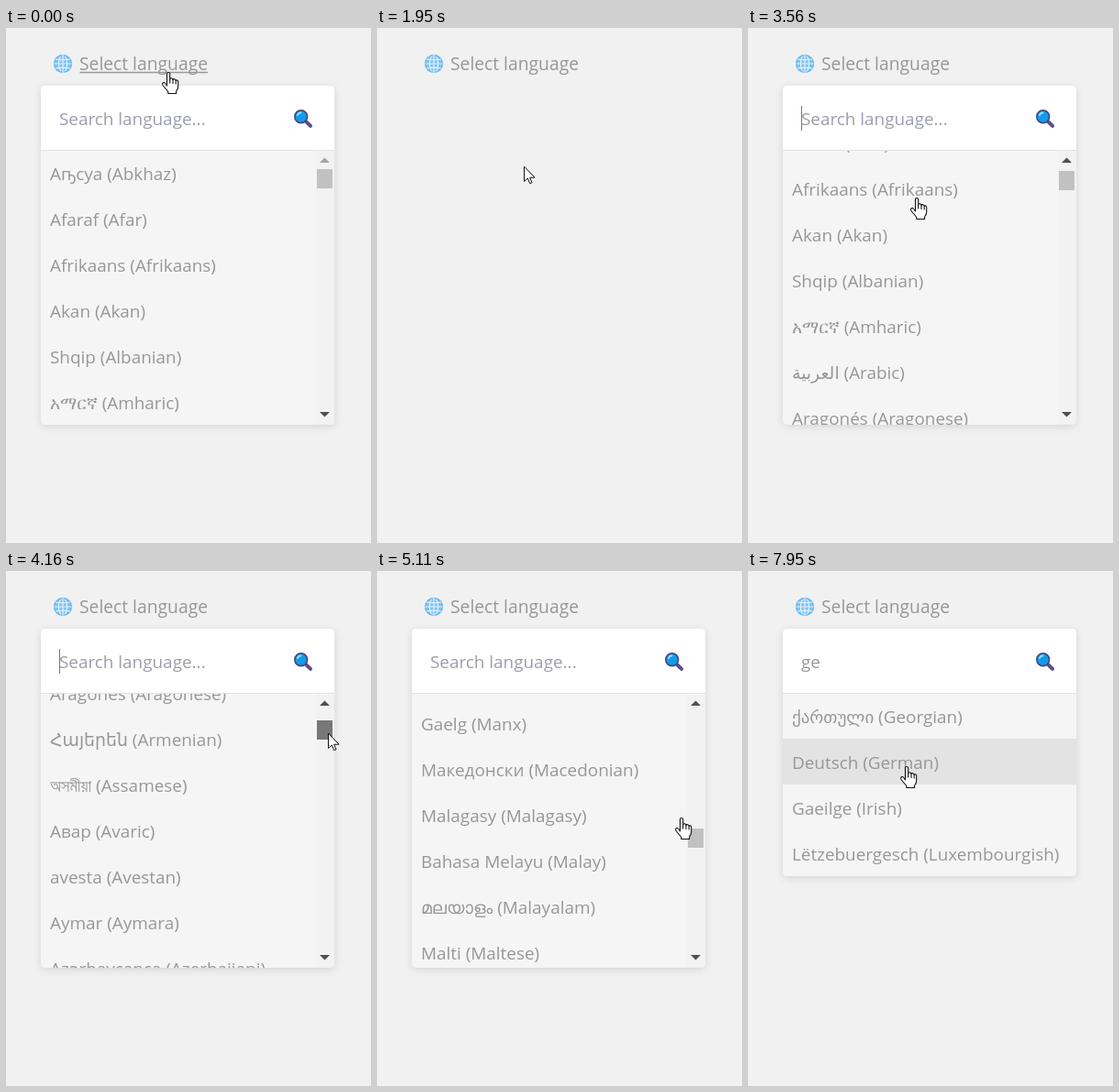
Write an HTML page that moves like this. It is 398 px wide and 562 px high and loops after 8000 ms.

```html
<!DOCTYPE html>
<html lang="en">
<head>
<meta charset="utf-8">
<title>Language picker</title>
<style>
html, body { margin: 0; width: 100%; height: 100%; overflow: hidden; background: #f1f1f1; }
svg { display: block; width: 398px; height: 562px; }
text { font-family: "Open Sans", "Noto Sans", "Noto Sans CJK KR", "DejaVu Sans", sans-serif; font-size: 18.9px; fill: #979797; white-space: pre; }
#title { font-size: 19.3px; }
#popup text { font-size: 15px; font-weight: 600; fill: #20232b; }
</style>
</head>
<body>
<svg viewBox="0 0 398 562">
  <defs>
    <clipPath id="listClip"><path id="listShape"/></clipPath>
    <filter id="soft" x="-20%" y="-20%" width="140%" height="140%"><feDropShadow dx="0" dy="2" stdDeviation="4" flood-opacity=".12"/></filter>
    <filter id="tight" x="-20%" y="-20%" width="140%" height="140%"><feDropShadow dx="0" dy="1" stdDeviation="1.6" flood-opacity=".32"/></filter>
  </defs>
  <rect width="398" height="562" fill="#f1f1f1"/>
  <g transform="translate(62 39)" fill="none" stroke="#e2f1fb" stroke-width="1.2">
    <circle r="10.2" fill="#80c3f2" stroke="none"/>
    <ellipse rx="4.6" ry="9.4"/><circle r="9.2" stroke="#72b9ed"/>
    <path d="M0-9.5V9.5M-9.5 0H9.5M-8-5Q0-3.4 8-5M-8 5Q0 3.4 8 5"/>
  </g>
  <text id="title" x="80" y="46">Select language</text>
  <path id="underline" d="M80.5 48.5H220" stroke="#999" stroke-width="1.3"/>

  <g id="panel">
    <rect id="back" x="38" y="63" width="320" rx="5" fill="#f5f5f5" filter="url(#soft)"/>
    <g id="list" clip-path="url(#listClip)">
      <rect id="hover" x="38" width="320" height="50" fill="#e3e3e3"/>
      <g id="rows"></g>
      <g id="bar">
        <rect x="338" y="133" width="20" height="300" fill="#f2f2f2"/>
        <rect id="thumb" x="339" width="17"/>
        <path id="up" d="M342 147L347.5 141.500L353 147Z"/>
        <path d="M342 419L347.5 424.500L353 419Z" fill="#505050"/>
      </g>
    </g>
    <path d="M38 134V68Q38 63 43 63H353Q358 63 358 68V134Z" fill="#e2e2e2"/>
    <path d="M38 133V68Q38 63 43 63H353Q358 63 358 68V133Z" fill="#fff"/>
    <text id="query" x="58" y="106"></text>
    <rect id="caret" x="58" y="85" width="1" height="27" fill="#777"/>
    <path d="M327.500 102.500L332 106.800" stroke="#5d4c94" stroke-width="4" stroke-linecap="round"/>
    <circle cx="321.700" cy="96.700" r="6.900" fill="#139bea" stroke="#46477b" stroke-width="1.6"/>
    <path d="M318 95Q319 92.300 321.500 92.500" fill="none" stroke="#8fdcff" stroke-width="2" stroke-linecap="round"/>
  </g>

  <g id="popup">
    <path d="M170 143H180L190 133L200 143H350Q358 143 358 151V236Q358 244 350 244H170Q162 244 162 236V151Q162 143 170 143Z" fill="#fff" filter="url(#tight)"/>
    <text x="177" y="177">sp</text><text x="177" y="221">fe</text>
  </g>

  <g id="pointer" stroke-linejoin="round" stroke-linecap="round">
    <path id="arrow" d="M.5.5V16.500L4.300 13L6.700 18.700L9 17.700L6.600 12.200H11.700Z" fill="#fff" stroke="#111"/>
    <g id="hand" fill="#fff" stroke="#111" stroke-width="1.1">
      <path d="M-.5 15V2Q-.5.5 1 .5T2.700 2V8Q3 6.500 4.500 6.800T6 8.500Q6.400 7.300 7.700 7.700T9.200 9.500Q9.700 8.500 10.800 9T11.700 11V16Q11.700 18.500 9.600 21V23.500H.8V21.500L-5 14.500Q-6 12.800-4.700 11.800T-2.300 12.500Z"/>
      <path d="M2.700 8V12M6 8.500V12.500M9.200 9.500V13" fill="none"/>
    </g>
    <path id="beam" d="M-3-8H-1Q0-8 0-7Q0-8 1-8H3M0-7V7M-3 8H-1Q0 8 0 7Q0 8 1 8H3" fill="none" stroke="#222" stroke-width="1.1"/>
  </g>
</svg>
<script>
const LOOP = 8000, STEP = 50, ROW = 50, LIST_TOP = 133, VIEW = 300, FULL_HEIGHT = 9250;

// native name | English name; a lone name is used for both
const labels = `Аҧсуа|Abkhaz,Afaraf|Afar,Afrikaans,Akan,Shqip|Albanian,አማርኛ|Amharic,العربية|Arabic,Aragonés|Aragonese,Հայերեն|Armenian,অসমীয়া|Assamese,Авар|Avaric,avesta|Avestan,Aymar|Aymara,Azərbaycanca|Azerbaijani,Bamanankan|Bambara,Башҡорт|Bashkir,Euskara|Basque,Беларуская|Belarusian,বাংলা|Bengali,भोजपुरी|Bihari,Bislama,Bosanski|Bosnian,Brezhoneg|Breton,Български|Bulgarian,ဗမာစာ|Burmese,Català|Catalan,Chamoru|Chamorro,Нохчийн|Chechen,ChiCheŵa|Chichewa,中文|Chinese,Чӑваш|Chuvash,Kernewek|Cornish,Corsu|Corsican,ᓀᐦᐃᔭᐍᐏᐣ|Cree,Hrvatski|Croatian,Česky|Czech,Dansk|Danish,ދިވެހި|Divehi,Nederlands|Dutch,English,Esperanto,Eesti|Estonian,Eʋegbe|Ewe,Føroyskt|Faroese,Vosa Vakaviti|Fijian,Suomi|Finnish,Français|French,Fulfulde|Fula,Galego|Galician,ქართული|Georgian,Deutsch|German,Ελληνικά|Greek,Avañeẽ|Guaraní,ગુજરાતી|Gujarati,Kreyòl ayisyen|Haitian,Hausa,עברית|Hebrew,Otjiherero|Herero,हिन्दी|Hindi,Hiri Motu,Magyar|Hungarian,Interlingua,Bahasa Indonesia|Indonesian,Interlingue,Gaeilge|Irish,Asụsụ Igbo|Igbo,Iñupiaq|Inupiaq,Ido,Íslenska|Icelandic,Italiano|Italian,ᐃᓄᒃᑎᑐᑦ|Inuktitut,日本語|Japanese,Basa Jawa|Javanese,Kalaallisut,ಕನ್ನಡ|Kannada,Kanuri,कश्मीरी|Kashmiri,Қазақ тілі|Kazakh,ភាសាខ្មែរ|Khmer,Gĩkũyũ|Kikuyu,Kinyarwanda,Кыргыз тили|Kirghiz,Коми кыв|Komi,Kongo,한국어|Korean,Kurdî|Kurdish,Kuanyama|Kwanyama,Latina|Latin,Lëtzebuergesch|Luxembourgish,Luganda,Limburgs|Limburgish,Lingála|Lingala,ພາສາລາວ|Lao,Lietuvių|Lithuanian,Luba-Katanga,Latviešu|Latvian,Gaelg|Manx,Македонски|Macedonian,Malagasy,Bahasa Melayu|Malay,മലയാളം|Malayalam,Malti|Maltese,Māori,मराठी|Marathi,Ebon|Marshallese`
  .split(",").map(entry => {
    const [native, english = native] = entry.split("|");
    return `${native} (${english})`;
  });

// Long labels take a second line while the scrollbar narrows the list.
function layout(query) {
  const found = labels.filter(label => label.toLowerCase().includes(query));
  const scrolls = found.length * ROW > VIEW;
  let top = 0;
  const rows = found.map(label => {
    const wraps = scrolls && label.length > 29;
    const row = { top, lines: wraps ? label.split(/ (?=\()/) : [label] };
    top += ROW + (wraps ? 27 : 0);
    return row;
  });
  return { rows, scrolls, height: query ? top : FULL_HEIGHT };
}
const layouts = { "": layout(""), g: layout("g"), ge: layout("ge") };
const topOf = name => layouts[""].rows.find(row => row.lines[0].startsWith(name)).top;

// [time, x, y]
const pointerPath = [
  [0, 176, 48], [50, 176, 48], [300, 196, 97], [800, 196, 97], [1150, 180, 44], [1300, 180, 44],
  [1620, 150, 230], [1750, 150, 230], [1950, 160, 151], [2220, 178, 46], [2310, 178, 46],
  [2450, 183, 185], [3760, 183, 185], [4060, 351, 176], [4160, 351, 177], [4710, 350, 275],
  [4860, 350, 293], [4960, 350, 293], [5650, 194, 98], [5960, 194, 98], [6060, 196, 97],
  [7420, 196, 97], [7850, 172, 213], [8000, 172, 213]
];
const kongo = topOf("Kongo") - 13, manx = topOf("Gaelg") - 8;
const scrollPath = [[0, 0], [3480, 0], [3560, 83], [3760, 300], [4110, 300], [4160, 375], [4710, kongo], [4860, manx], [8000, manx]];
const caretTimes = [[50, 550], [1050, 1300], [2500, 2750], [3250, 4750], [5250, 5960], [6260, 7290]];

const within = (t, ...spans) => spans.some(([from, to]) => t >= from && t < to);
const smooth = k => k * k * (3 - 2 * k);
const linear = k => k;

// Movement advances in discrete screen updates, offset slightly in the middle of the loop.
function stepped(t) {
  const phase = within(t, [2910, 6500]) ? 10 : 0;
  return Math.floor((t - phase) / STEP) * STEP + phase;
}

function sample(path, t, ease) {
  const i = Math.max(1, path.findIndex(key => key[0] > t));
  const [a, b] = [path[i - 1], path[i]];
  const k = ease((t - a[0]) / (b[0] - a[0]));
  return a.slice(1).map((v, n) => v + (b[n + 1] - v) * k);
}

const $ = id => document.getElementById(id);
const set = (id, attrs) => { for (const key in attrs) $(id).setAttribute(key, attrs[key]); };
const show = (id, on) => set(id, { visibility: on ? "visible" : "hidden" });

const pool = Array.from({ length: 9 }, () => {
  const node = document.createElementNS("http://www.w3.org/2000/svg", "text");
  node.setAttribute("x", 48);
  return $("rows").appendChild(node);
});

function drawRows(rows, scroll) {
  const lines = rows.flatMap(({ top, lines }) =>
    lines.map((text, n) => ({ text, y: Math.round(166 + top + n * 27 - scroll) })))
    .filter(({ y }) => y > 125 && y < 455);
  pool.forEach((node, i) => {
    const { text, y } = lines[i] || { text: "", y: 0 };
    if (node.textContent !== text) node.textContent = text;
    node.setAttribute("y", y);
  });
}

function drawPointer(t, open, listed, bottom) {
  const [x, y] = sample(pointerPath, stepped(t), smooth);
  const overLink = x > 50 && x < 221 && y < 52;
  const overSearch = open && y >= 63 && y < LIST_TOP;
  const overRows = listed && x < 338 && y >= LIST_TOP && y < bottom;
  const kind = overSearch ? "beam" : overLink || overRows ? "hand" : "arrow";
  const visible = !within(t, [6410, 7290]);
  for (const id of ["arrow", "hand", "beam"]) show(id, visible && id === kind);
  set("pointer", { transform: `translate(${Math.round(x)} ${Math.round(y)})` });
  show("underline", overLink);
  const hovered = t > 7400 && overRows;
  set("hover", { y: LIST_TOP + Math.floor((y - LIST_TOP) / ROW) * ROW, opacity: hovered ? 1 : 0 });
}

function render(t) {
  const open = !within(t, [1300, 2300]);
  const listed = open && !within(t, [2300, 2750]);
  const query = t < 6410 ? "" : t < 6780 ? "g" : "ge";
  const { rows, scrolls, height } = layouts[query];
  const scroll = query ? 0 : sample(scrollPath, stepped(t), linear)[0];
  const shown = listed ? Math.min(VIEW, height) : 0;
  const bottom = LIST_TOP + shown;

  set("panel", { display: open ? "inline" : "none" });
  set("list", { display: listed ? "inline" : "none" });
  set("back", { height: bottom - 63 });
  set("listShape", { d: `M38 133H358V${bottom - 5}q0 5-5 5H43q-5 0-5-5Z` });
  drawRows(rows, scroll);

  const thumbHeight = Math.max(21, 258 * VIEW / height);
  const thumbTop = 154 + scroll * (258 - thumbHeight) / Math.max(1, height - VIEW);
  set("bar", { display: scrolls ? "inline" : "none" });
  set("thumb", {
    y: Math.floor(thumbTop), height: Math.round(thumbHeight),
    fill: within(t, [4110, 4910]) ? "#787878" : "#c1c1c1"
  });
  set("up", { fill: scroll > 0 ? "#505050" : "#a3a3a3" });

  $("query").textContent = query || "Search language...";
  $("query").style.fill = query ? "#979797" : "#9c9eac";
  set("caret", {
    x: 58 + query.length * 11,
    opacity: open && within(t, ...caretTimes) ? 1 : 0
  });
  show("popup", within(t, [300, 1250], [5700, 6410]));
  drawPointer(t, open, listed, bottom);
}

const start = performance.now();
function tick() {
  render((performance.now() - start) % LOOP);
  requestAnimationFrame(tick);
}
tick();
</script>
</body>
</html>
```
